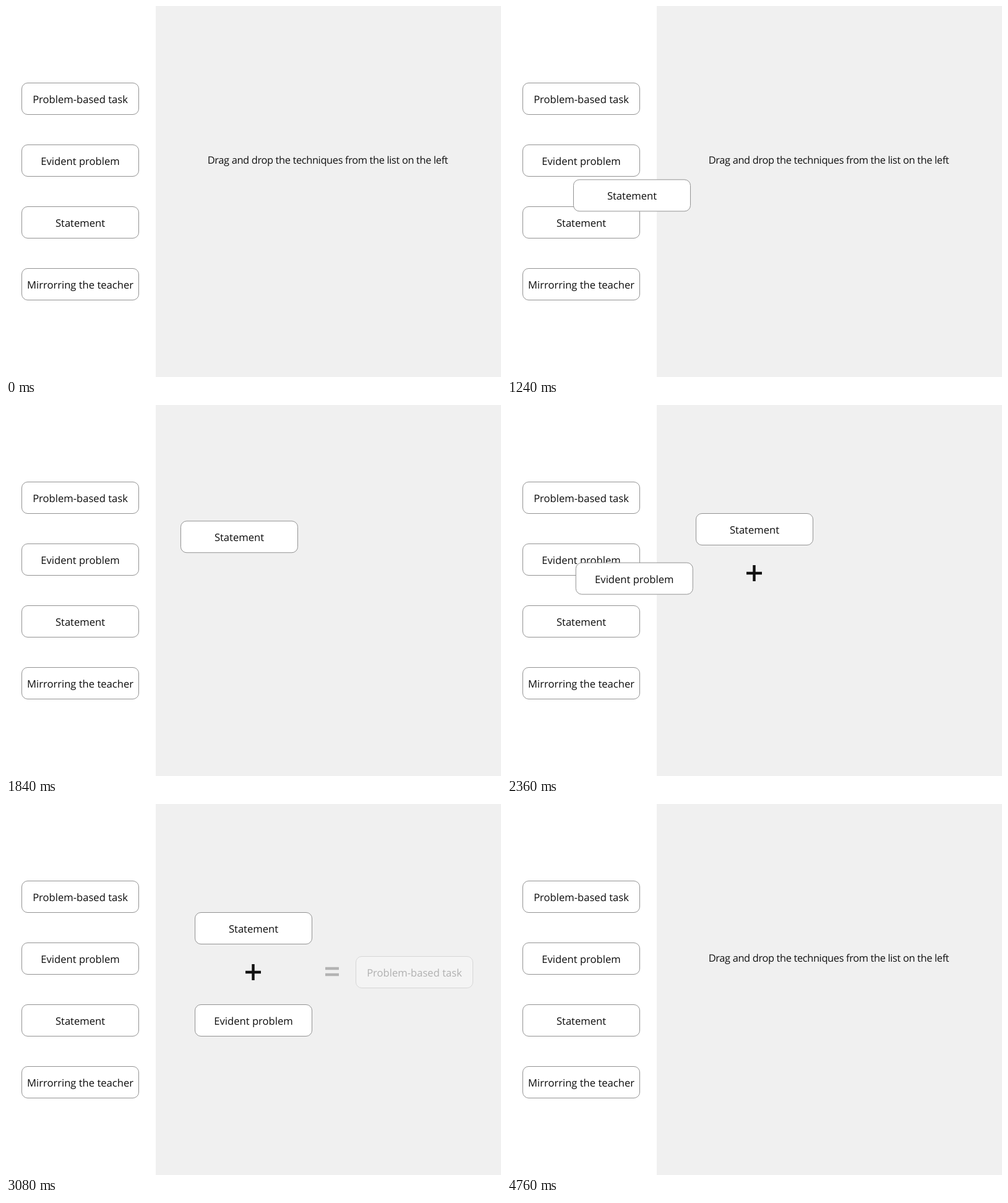
Animation, 800 px wide and 600 px high, one loop 4800 ms. Source, as an HTML page:

```html
<!DOCTYPE html>
<html lang="en">
<head>
<meta charset="utf-8">
<title>Drag and drop</title>
<style>
  html, body { margin: 0; width: 100%; height: 100%; overflow: hidden; background: #fff; }
  svg { display: block; width: 800px; height: 600px; }
  text {
    font: 16.6px "Open Sans", "Noto Sans", sans-serif;
    text-anchor: middle;
    text-rendering: geometricPrecision;
    fill: #0c0c0c;
  }
  #prompt { font-size: 16.4px; letter-spacing: -.35px; fill: #111; }
  rect.card { fill: #fff; stroke: #929292; }
  .sign { fill: none; stroke: #111; stroke-width: 4.4; }
</style>
</head>
<body>
<svg id="stage" viewBox="0 0 800 600">
  <path d="M242 0H800V600H242Z" fill="#f0f0f0"/>
  <g id="cards"></g>
  <path id="plus" class="sign" d="M387 272H412M399.5 259V285"/>
  <path id="equals" class="sign" d="M516 266H538M516 276H538"/>
  <text id="prompt" x="520" y="255">Drag and drop the techniques from the list on the left</text>
</svg>
<script>
const LOOP = 4800;
const $ = id => document.getElementById(id);

function addCard(label, x, y) {
  const g = document.createElementNS("http://www.w3.org/2000/svg", "g");
  g.innerHTML = `<rect class="card" x=".5" y=".5" width="189" height="51" rx="9.5"/>
    <text x="95" y="33">${label}</text>`;
  $("cards").append(g);
  place(g, x, y);
  return g;
}

const place = (g, x, y) => g.setAttribute("transform", `translate(${x} ${y})`);
const ramp = (t, from, to) => Math.min(1, Math.max(0, (t - from) / (to - from)));
const fade = (el, alpha) => el.setAttribute("opacity", alpha);

["Problem-based task", "Evident problem", "Statement", "Mirrorring the teacher"]
  .forEach((label, i) => addCard(label, 25, 124 + 100 * i));

const drags = [
  { card: addCard("Statement", 25, 324), y0: 324, y1: 175, start: 960, end: 1920 },
  { card: addCard("Evident problem", 25, 224), y0: 224, y1: 324, start: 2160, end: 2816 }
];
const result = addCard("Problem-based task", 565, 246);

function draw(t) {
  const reset = ramp(t, 4560, 4760);
  const stay = 1 - reset;

  for (const { card, y0, y1, start, end } of drags) {
    const p = ramp(t, start, end);
    place(card, 25 + 280 * p, y0 + (y1 - y0) * p);
    fade(card, t > start ? stay : 0);
  }
  fade($("plus"), ramp(t, 1920, 2160) * stay);

  const answer = ramp(t, 2990, 3320) * stay;
  fade($("equals"), answer);
  fade(result, answer);

  fade($("prompt"), 1 - ramp(t, 1400, 1640) + reset);
}

const begin = performance.now();
function tick() {
  draw((performance.now() - begin) % LOOP);
  requestAnimationFrame(tick);
}
tick();
</script>
</body>
</html>
```
